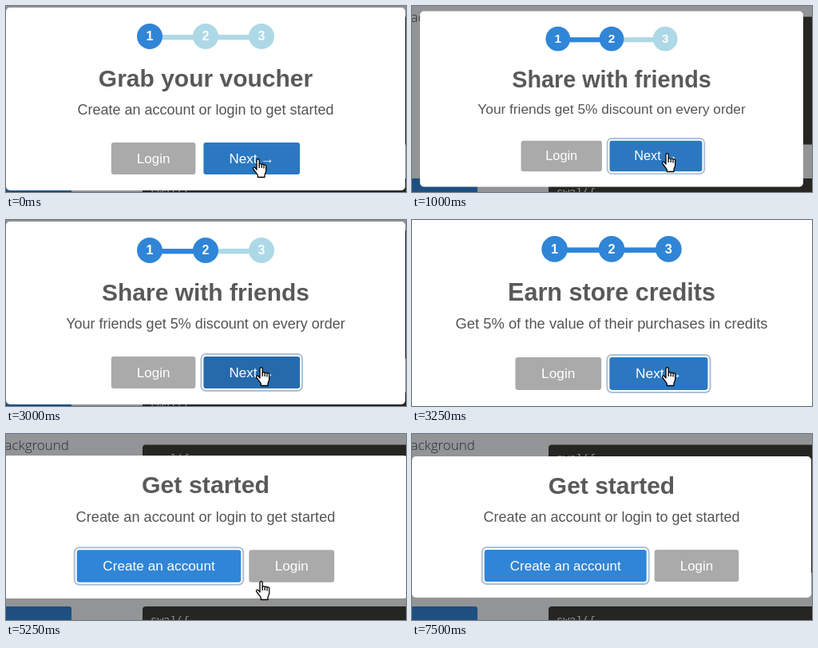
An HTML page that plays this animation: 501x233 px, repeating every 7.75 s.

```html
<!DOCTYPE html>
<html lang="en">
<head>
<meta charset="utf-8">
<title>Voucher steps</title>
<style>
  html, body { margin: 0; width: 100%; height: 100%; overflow: hidden; background: #939496; }
  svg { display: block; width: 501px; height: 233px; }
  text { font-family: "Liberation Sans", Arial, sans-serif; text-anchor: middle; }
  .title { font-size: 30px; font-weight: 700; fill: #595959; }
  .body { font-size: 18px; fill: #545454; }
  .label { font-size: 17px; fill: #fff; }
  .num { font-size: 16px; font-weight: 700; fill: #fff; }
  .page { font: 300 17px "Open Sans", sans-serif; text-anchor: end; fill: #2b2b2c; }
  .code { font: 13.6px "Liberation Mono", monospace; text-anchor: start; fill: #94948f; }
</style>
</head>
<body>
<svg viewBox="0 0 501 233">
  <rect width="501" height="233" fill="#939496"/>
  <text class="page" x="79" y="20">background</text>
  <rect x="171" y="13.5" width="340" height="160" rx="4" fill="#252621"/>
  <text class="code" x="181" y="34">swal({</text>
  <rect x="-10" y="216" width="92" height="40" rx="3" fill="#1d5080"/>
  <rect x="171" y="216" width="340" height="60" rx="4" fill="#252621"/>
  <text class="code" x="181" y="237">swal({</text>
  <g id="popup"></g>
  <g id="hand" stroke="#000" stroke-width="1.3" stroke-linejoin="round">
    <path fill="#fff" d="M5.5 14.5V2.8a1.6 1.6 0 0 1 3.2 0V8.5a1.5 1.5 0 0 1 3 .3a1.4 1.4 0 0 1 2.8 .6a1.4 1.4 0 0 1 2.7 .8V16c0 2-1.7 3.5-1.7 5.5V24H6.8V21.5C5.5 19 3 16.5 1.2 13.6c-.8-1.6 1-2.8 2.4-1.4z"/>
    <path fill="none" d="M8.7 8.5V12.5M11.7 9V12.5M14.5 9.8V13"/>
  </g>
</svg>
<script>
const LOOP = 7750, CX = 250, CY = 116.5;
const BLUE = '#3085d6', HOVER = '#2b78c1', PRESSED = '#266aab';
const PALE = '#add8e6', GREY = '#aaa', GREY_HOVER = '#999';

const pages = [
  ['Get started', 'Create an account or login to get started'],
  ['Grab your voucher', 'Create an account or login to get started'],
  ['Share with friends', 'Your friends get 5% discount on every order'],
  ['Earn store credits', 'Get 5% of the value of their purchases in credits']
];

// start, page (0 = final dialog), scale, main colour, ring, login colour, hand [x, y]
const start = [308.5, 190.5], rest = [312.5, 183.5];
const steps = [
  [0,    1, 1,     HOVER,   false, GREY, start],
  [250,  1, 1,     HOVER,   false, GREY, rest],
  [750,  1, 1,     PRESSED, true,  GREY, rest],
  [1000, 2, 0.96,  HOVER,   true,  GREY, rest],
  [1250, 2, 1,     HOVER,   true,  GREY, rest],
  [3000, 2, 1,     PRESSED, true,  GREY, rest],
  [3250, 3, 1.02,  HOVER,   true,  GREY, rest],
  [3500, 3, 1,     HOVER,   true,  GREY, rest],
  [5250, 0, 1.012, BLUE,    true,  GREY, rest],
  [5500, 0, 1,     BLUE,    true,  GREY_HOVER, rest],
  [6750, 0, 1,     BLUE,    true,  GREY, [302.5, 183]],
  [7000, 0, 1,     BLUE,    true,  GREY, [268, 227]],
  [7250, 0, 1,     BLUE,    true,  GREY, null]
];

const rect = (x, y, w, h, r, fill) =>
  `<rect x="${x}" y="${y}" width="${w}" height="${h}" rx="${r}" fill="${fill}"/>`;
const text = (cls, x, y, s) => `<text class="${cls}" x="${x}" y="${y}">${s}</text>`;

function button(x, y, w, label, fill, ring) {
  const glow = ring
    ? rect(x - 4, y - 4, w + 8, 48, 7, 'rgba(50,100,150,.4)') + rect(x - 2, y - 2, w + 4, 44, 5, '#fff')
    : '';
  return glow + rect(x, y, w, 40, 3, fill) + text('label', x + w / 2, y + 25.5, label);
}

function progress(current) {
  let out = '';
  for (let i = 1; i < 3; i++)
    out += rect(125 + 70 * i, 36, 40, 6.4, 0, i < current ? BLUE : PALE);
  for (let i = 1; i <= 3; i++) {
    const x = 110 + 70 * i;
    out += `<circle cx="${x}" cy="38" r="16" fill="${i <= current ? BLUE : PALE}"/>`
      + text('num', x, 43.3, i);
  }
  return out;
}

function dialog(page, main, ring, login) {
  const [title, body] = pages[page];
  const dy = page ? 0 : -26;
  const top = page ? 2 : 28;
  return rect(0, top, 500, 2 * (CY - top), 5, '#fff')
    + (page ? progress(page) : '')
    + text('title', CX, 101 + dy, title)
    + text('body', CX, 136 + dy, body)
    + (page
      ? button(131.8, 171, 105.6, 'Login', login) + button(247.4, 171, 120.7, 'Next →', main, ring)
      : button(90.7, 145, 203, 'Create an account', main, ring) + button(303.7, 145, 105.6, 'Login', login));
}

const popup = document.getElementById('popup');
const hand = document.getElementById('hand');
let shown = null;

function draw(time) {
  const step = steps.findLast(s => s[0] <= time);
  if (step === shown) return;
  shown = step;
  const [, page, scale, main, ring, login, pos] = step;
  popup.innerHTML = dialog(page, main, ring, login);
  popup.setAttribute('transform',
    `translate(${CX} ${CY}) scale(${scale}) translate(${-CX} ${-CY})`);
  hand.style.display = pos ? '' : 'none';
  if (pos) hand.setAttribute('transform', `translate(${pos})`);
}

const t0 = performance.now();
function tick() {
  draw((performance.now() - t0) % LOOP);
  requestAnimationFrame(tick);
}
tick();
</script>
</body>
</html>
```
